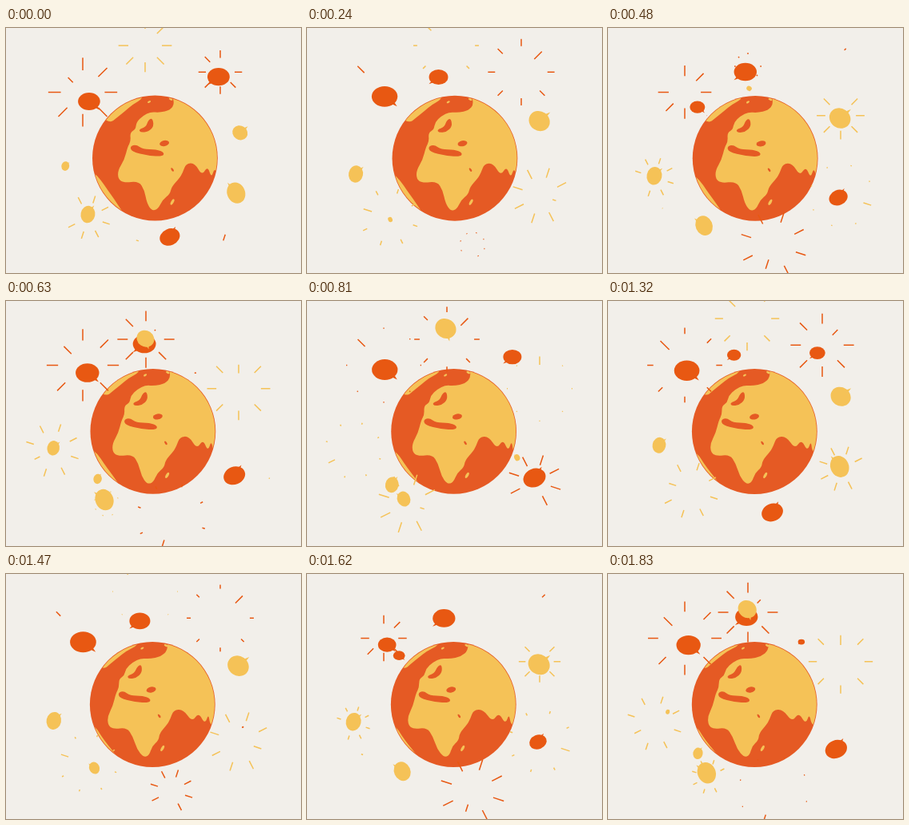
An HTML page with a canvas for the animation above (1860 ms loop, 369x307 px).

```html
<!DOCTYPE html>
<html>
<head>
<meta charset="utf-8">
<style>
html, body { margin: 0; width: 369px; height: 307px; overflow: hidden; background: #f2efea; }
canvas { display: block; }
</style>
</head>
<body>
<canvas id="stage" width="369" height="307"></canvas>
<script>
const ctx = document.getElementById('stage').getContext('2d');
const LOOP = 1860, CYCLE = 1170, STEP = 30, R = 78, CX = 183, CY = 163, TAU = Math.PI * 2;
const BG = '#f2efea', SEA = '#e55a24', RED = '#e85812', GOLD = '#f5c257';
const mod = (a, n) => ((a % n) + n) % n;
const rad = d => d * Math.PI / 180;

// Coast points as x, y pairs at the start of the turn
const CONTINENT = [206,80, 211,95, 205,103, 192,106, 181,105, 171,110, 163,118, 162,127, 155,131,
  156,142, 152,149, 148,165, 140,178, 140,189, 147,194, 166,192, 173,203, 176,219, 182,229, 190,227,
  196,215, 205,208, 207,199, 217,188, 221,181, 225,170, 236,169, 245,185, 252,173, 257,188, 261,174,
  268,192, 300,190, 300,90, 260,70];
const GREENLAND = [129,120, 139,112, 149,104, 158,96, 172,88, 170,72, 105,100];
const AMERICA = [109,180, 119,191, 127,203, 135,214, 142,225, 150,236, 90,250, 85,180];
const BALTIC = [166,127, 175,124, 178,115, 183,113, 185,123, 178,130, 168,131];
const MED = [155,148, 163,146, 171,152, 188,152, 198,156, 196,161, 178,160, 157,155];

// Turns a point of the sphere about its upright axis; far points stay outside the rim
function project(x, y, turn) {
  const dx = x - 186.3, dy = y - CY;
  const rho = Math.sqrt(Math.max(100, R * R - dy * dy));
  const side = Math.sign(dx), k = Math.abs(dx) / rho;
  const lon = side * (k > 1 ? Math.PI / 2 + k - 1 : Math.asin(k)) - turn;
  const over = Math.abs(lon) - Math.PI / 2;
  return [over > 0 ? Math.sign(lon) * rho * (1 + over) : rho * Math.sin(lon), dy];
}

function coast(list, color, turn) {
  const pts = [];
  for (let i = 0; i < list.length; i += 2) pts.push(project(list[i], list[i + 1], turn));
  ctx.beginPath();
  for (let i = 0; i <= pts.length; i++) {
    const p = pts[i % pts.length], q = pts[(i + 1) % pts.length];
    const mid = [(p[0] + q[0]) / 2, (p[1] + q[1]) / 2];
    if (i) ctx.quadraticCurveTo(...p, ...mid);
    else ctx.moveTo(...mid);
  }
  ctx.fillStyle = color;
  ctx.fill();
}

function oval(x, y, rx, ry, tilt, color) {
  ctx.fillStyle = color;
  ctx.beginPath();
  ctx.ellipse(x, y, rx, ry, tilt, 0, TAU);
  ctx.fill();
}

function globe(t) {
  const turn = 0.22 * t / 1830, ease = Math.exp(-t / 400);
  const spot = (x, y, rx, ry, tilt, color) => oval(...project(x, y, turn), rx, ry, tilt, color);
  ctx.save();
  ctx.translate(CX + 0.2 + 3.2 * ease, CY + 0.5 - 0.5 * ease);
  ctx.beginPath();
  ctx.arc(0, 0, R + 0.4, 0, TAU);
  ctx.fillStyle = SEA;
  ctx.fill();
  ctx.beginPath();
  ctx.arc(0, 0, R - 0.4, 0, TAU);
  ctx.clip();
  for (const shape of [CONTINENT, GREENLAND, AMERICA]) coast(shape, GOLD, turn);
  for (const shape of [BALTIC, MED]) coast(shape, SEA, turn);
  spot(198, 144.5, 6, 3.5, -0.2, SEA);
  spot(208, 177.5, 1.3, 2.6, -0.6, SEA);
  spot(208, 218, 1.7, 4, 0.5, GOLD);
  spot(179, 92.5, 2.2, 1.2, -0.5, GOLD);
  spot(206, 89, 2.5, 1.4, 0.5, GOLD);
  ctx.restore();
}

// Each bubble leaves the globe, rests at x, y and bursts into rays.
// born, gone, flash: times in ms; tail: degrees; late: index of the delayed ray
function bubble(color, x, y, size, tail, born, gone, flash, reach, late, from) {
  const far = Math.hypot(x - CX, y - CY) / R, low = y > CY;
  return {
    color, x, y, size, tail: rad(tail), born, gone, flash, reach, late, low,
    from: from || [CX + (x - CX) / far, CY + (y - CY) / far],
    ratio: color === RED ? 0.8 : low ? 1.2 : 0.9,
    tilt: !low ? (color === RED ? 0 : 0.6) : x < 110 ? 0.2 : -0.4
  };
}

const HALF = CYCLE / 2;
const bubbles = [
  bubble(RED, 95, 84, 33, 45, 385, 1066, 385, 47, 5),
  bubble(RED, 95, 84, 33, 45, 385 + HALF, 1066 + HALF, 385 + HALF, 47, 5),
  bubble(RED, 174, 53, 29, 138, 50, 720, 470, 41, 7, [144, 80]),
  bubble(GOLD, 173, 28, 28, 75, 450, 1155, 1040, 41, 5),
  bubble(RED, 267, 60, 28, 138, 620, 1352, 1100, 42, 7, [235, 92]),
  bubble(GOLD, 290, 112, 28, -42, 1038, 1710, 385, 41, 6, [296, 155]),
  bubble(GOLD, 291, 208, 23, 225, 770, 1390, 60, 40, 0),
  bubble(RED, 284, 223, 29, -62, 290, 900, 690, 43, 2, [297, 190]),
  bubble(RED, 206, 267, 28, -66, 890, 1400, 235, 44, 2),
  bubble(GOLD, 102, 234, 18, -50, 535, 1240, 1070, 37, 4),
  bubble(GOLD, 125, 250, 23, 212, 210, 842, 625, 42, 0, [100, 238]),
  bubble(GOLD, 57, 186, 19, -38, 1090, 1840, 405, 36, 3, [85, 165])
];

function drawBubble(b, t) {
  const age = mod(t - b.born, CYCLE), left = b.gone - b.born - age;
  if (left <= 0) return;
  const shrink = Math.max(0, 1 - left / 70);
  const back = Math.max(Math.exp(-age / 165), shrink ** 3);
  const x = b.x + (b.from[0] - b.x) * back, y = b.y + (b.from[1] - b.y) * back;
  const r = b.size / 2 * (1 - Math.exp(-age / 110)) * (1 - shrink ** 2);
  const rim = (turn, k) => [x + Math.cos(b.tail + turn) * r * k, y + Math.sin(b.tail + turn) * r * b.ratio * k];
  oval(x, y, r, r * b.ratio, b.tilt, b.color);
  ctx.beginPath();
  ctx.moveTo(...rim(-0.2, 0.85));
  ctx.lineTo(...rim(0, 1.36));
  ctx.lineTo(...rim(0.15, 0.85));
  ctx.fill();
}

function drawRays(b, t) {
  const age = mod(t - b.flash, CYCLE), span = 440, near = 15, len = b.reach - near;
  const cx = b.x + 1, cy = b.y + (b.y - CY) * 0.045;
  ctx.strokeStyle = b.color;
  ctx.lineWidth = 1.5;
  ctx.beginPath();
  for (let i = 0; i < 8; i++) {
    const u = (age - (i === b.late ? 150 : 0)) / span;
    if (u <= 0 || u >= 1) continue;
    const a = rad(i * 45 + (b.low ? 18 : 0));
    const inner = near + len * u ** 1.2, outer = near + len * (1 - (1 - u) ** 3.5);
    ctx.moveTo(cx + Math.cos(a) * inner, cy + Math.sin(a) * inner);
    ctx.lineTo(cx + Math.cos(a) * outer, cy + Math.sin(a) * outer);
  }
  ctx.stroke();
}

function draw(now) {
  const t = Math.floor(mod(now, LOOP) / STEP) * STEP;
  ctx.fillStyle = BG;
  ctx.fillRect(0, 0, 369, 307);
  globe(t);
  bubbles.forEach(b => drawRays(b, t));
  bubbles.forEach(b => drawBubble(b, t));
}

let begin;
function tick(now) {
  if (begin === undefined) begin = now;
  draw(now - begin);
  requestAnimationFrame(tick);
}
draw(0);
requestAnimationFrame(tick);
</script>
</body>
</html>
```
